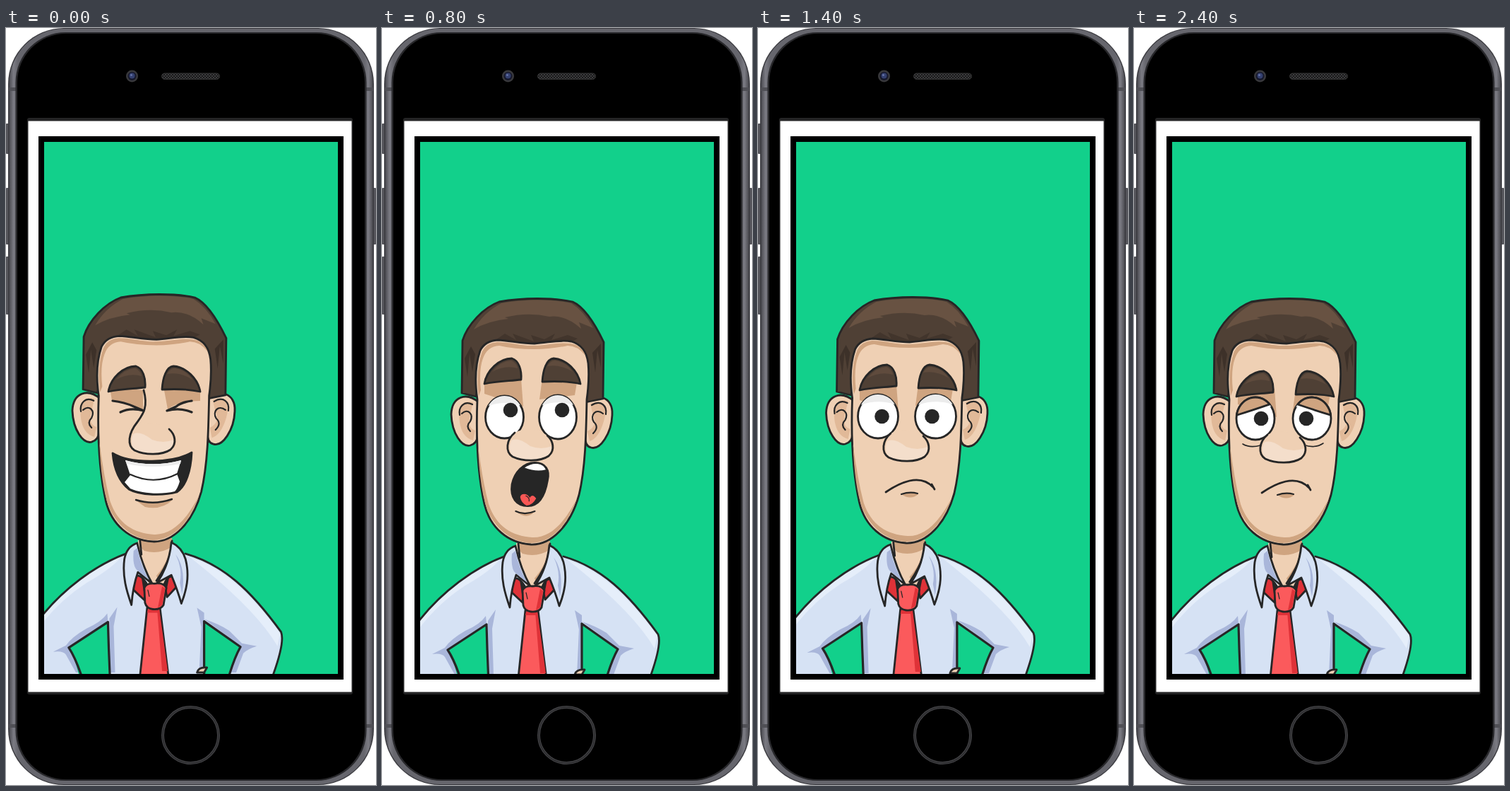
Animation, 524 px wide and 1070 px high, one loop 2600 ms. Source, as an HTML page:

```html
<!DOCTYPE html>
<html lang="en">
<head>
<meta charset="utf-8">
<title>Many moods</title>
<style>
html, body { margin: 0; width: 100%; height: 100%; overflow: hidden; background: #fff; }
svg { display: block; width: 100%; height: 100%; }
.ink { stroke: #262626; stroke-width: 2.8; stroke-linecap: round; stroke-linejoin: round; }
.mood { visibility: hidden; }
.mood.on { visibility: visible; }
</style>
</head>
<body>
<svg viewBox="0 0 524 1070">
  <defs>
    <linearGradient id="rim">
      <stop offset="0" stop-color="#4a4a50"/><stop offset=".012" stop-color="#7b7b83"/>
      <stop offset=".024" stop-color="#66666d"/><stop offset=".976" stop-color="#66666d"/>
      <stop offset=".988" stop-color="#7b7b83"/><stop offset="1" stop-color="#4a4a50"/>
    </linearGradient>
    <pattern id="mesh" width="4" height="4" patternUnits="userSpaceOnUse">
      <rect width="4" height="4" fill="#19191a"/>
      <path d="M0 0L4 4M4 0L0 4" stroke="#454547" stroke-width=".8"/>
    </pattern>
    <clipPath id="screen"><rect x="54" y="161" width="416" height="752"/></clipPath>
  </defs>
  <g id="phone"></g>
  <g clip-path="url(#screen)">
    <g id="man"></g>
    <g id="moods"></g>
  </g>
</svg>
<script>
const SKIN = '#efd0b4', TAN = '#cfa480', HAIR = '#4f4035', BROWN = '#685242';
const SHIRT = '#d6e2f4', BLUE = '#a9b6da', PALE = '#e5eefa', INK = '#262626';
const RED = '#fb5a5c', CRIMSON = '#df3238', GREEN = '#12d08b';

const shape = (d, fill) => `<path d="${d}" fill="${fill}"/>`;
const inked = (d, fill) => `<path class="ink" d="${d}" fill="${fill}"/>`;
const line = (d, w = 2.8) => `<path class="ink" d="${d}" fill="none" style="stroke-width:${w}"/>`;
const rect = (x, y, w, h, fill, r = 0, more = '') =>
  `<rect x="${x}" y="${y}" width="${w}" height="${h}" rx="${r}" fill="${fill}" ${more}/>`;
const disc = (x, y, r, fill, more = '') => `<circle cx="${x}" cy="${y}" r="${r}" fill="${fill}" ${more}/>`;
const moved = (x, y, body, sx = 1, sy = sx) =>
  `<g transform="translate(${x} ${y}) scale(${sx} ${sy})">${body}</g>`;

function phone() {
  const keys = [[0, 135, 43], [0, 226, 80], [0, 323, 82], [519, 226, 80]]
    .map(([x, y, h]) => rect(x, y, 5, h, '#55555b', 1)).join('');
  const bands = [84, 984].map(y =>
    rect(4, y, 10, 5, '#505056') + rect(510, y, 10, 5, '#505056')).join('');
  return keys +
    rect(3, 0, 518, 1070, '#3c3c41', 79) +
    rect(4.5, 1, 515, 1068, 'url(#rim)', 78) + bands +
    rect(13.5, 6, 497, 1058, '#28282b', 71) +
    rect(16, 8, 492, 1054, '#000', 69) +
    disc(178.5, 68, 8.5, '#39393c') + disc(178.5, 68, 6, '#15172b') +
    disc(178.5, 67.5, 4, '#34406f') + disc(177.5, 66.5, 1.5, '#6472a5') +
    rect(220.5, 64, 82, 8.5, 'url(#mesh)', 4.2, 'stroke="#333" stroke-width="1"') +
    disc(261.5, 999.5, 39.5, '#000', 'stroke="#414144" stroke-width="4"') +
    disc(261.5, 999.5, 39.5, 'none', 'stroke="#29292b" stroke-width="1.4"') +
    rect(30, 127, 461, 815, '#242425', 3) +
    rect(31.5, 131.5, 458, 807, '#fff') +
    rect(46, 153, 432, 768, '#000') + rect(54, 161, 416, 752, GREEN);
}

function shirt() {
  const left = 'M34 862L54 836C85 797 130 763 173 747';
  const right = 'C310 762 349 799 391 857Q397 872 377 925';
  return shape(`${left}H257${right}V940H34Z`, SHIRT) +
    shape('M54 838C86 799 130 766 168 750Q155 767 118 788Q81 812 54 847Z', PALE) +
    shape('M263 752C313 768 350 805 390 859L386 877Q355 824 263 752Z', PALE) +
    shape('M93 878L148 842L147 831Q139 843 118 852Q97 864 89 876L71 885Q85 883 89 889L103 914H111Z', BLUE) +
    shape('M283 839Q302 845 318 855L336 873L357 877Q344 881 338 887L328 914H320L334 878L306 856Z', BLUE) +
    shape('M150 838L161 822L156 849L158 914H150Z', BLUE) +
    shape('M283 830L273 823L279 850L276 914H283Z', BLUE) +
    shape('M147 844L94 879Q102 891 112 940H150V913Z', GREEN) +
    shape('M283 842L334 878Q325 896 312 940H283Z', GREEN) +
    line(left + 'M257 747' + right) +
    line('M148 843L93 879Q103 894 113 925M148 843Q149 884 151 925', 3.2) +
    line('M283 842L334 878Q325 894 316 925M283 842V925', 3.2) +
    inked('M273 914Q275 906 287 907L283 914Z', SKIN);
}

function collar() {
  return shape('M190 728H239L240 752L225 792L205 790L192 760Z', SKIN) +
    shape('M193 725H238V737Q220 749 199 743L193 737Z', TAN) +
    shape('M236 739L240 759L219 785L216 778Q231 761 236 739Z', TAN) +
    line('M193 729L195 748M238 729L236 747Q229 767 216 785') +
    inked('M184 780Q193 773 202 789L199 812L184 798Z', CRIMSON) +
    inked('M241 780Q232 776 227 790L231 808L244 794Z', CRIMSON) +
    shape('M195 780Q204 786 205 793L198 800ZM234 780L226 791L230 800Z', INK) +
    inked('M189 732Q174 737 171 755C168 779 174 799 181 819Q183 793 190 773L210 789Q196 764 189 732Z', SHIRT) +
    shape('M184 743Q182 766 190 771L205 783Q193 761 189 739Z', BLUE) +
    inked('M237 731Q252 738 257 755C263 779 258 799 251 817Q246 799 237 777L217 788Q234 763 237 731Z', SHIRT) +
    shape('M243 748Q253 768 249 788L252 804Q258 768 243 748Z', BLUE) +
    inked('M203 823L192 928H234L221 823Z', RED) +
    shape('M217 825L224 912H232L220 824Z', CRIMSON) +
    shape('M204 825H219L218 830H203Z', CRIMSON) +
    inked('M199 795Q202 788 213 789Q226 787 230 795L226 819Q222 826 211 825Q202 824 200 816Z', RED) +
    shape('M224 793L228 796L224 819L218 823Z', CRIMSON) +
    line('M204 798L206 807', 1.2);
}

function head() {
  return inked('M137 529C119 514 99 521 98 546C99 573 113 593 125 590Q135 587 135 577Z', SKIN) +
    shape('M129 529C110 524 107 543 111 562Q115 579 129 583L132 569Q121 565 124 551Z', '#e1b998') +
    line('M128 532C116 526 108 536 110 547M113 545C122 537 130 546 125 556Q118 563 125 570', 2.2) +
    inked('M288 530C302 515 328 520 326 547C325 573 309 597 296 593Q287 591 288 577Z', SKIN) +
    shape('M295 531C313 525 320 538 314 556Q307 580 294 584L291 570Q306 562 299 548Z', '#e1b998') +
    line('M297 533C310 525 319 534 317 546M313 545C303 537 294 547 300 557Q308 564 299 573', 2.2) +
    inked('M113 516L114 442C121 419 144 395 166 387C199 381 243 381 270 387C286 394 302 419 314 444L313 524L288 529L277 453H150L133 521Z', HAIR) +
    shape('M130 426Q144 402 169 389C201 383 243 383 268 389Q286 400 299 424L279 416L282 425Q260 405 237 408Q207 401 174 409L179 411Q150 414 130 426Z', BROWN) +
    shape('M117 467L121 493L124 460L128 486L132 461L126 450ZM298 459L302 487L305 455L310 480L310 446Z', '#3d3129') +
    shape('M174 432L190 441L185 432L215 443L211 434L230 440L245 432L240 441L263 434L277 439L265 446L216 449L158 443Z', '#42352c') +
    inked('M135 525Q129 485 139 456Q146 442 164 441C181 442 199 446 216 446C235 445 251 440 268 443Q289 449 292 474Q294 496 290 525C289 577 288 622 279 660C267 703 240 731 211 730C178 728 153 706 145 673C136 633 133 578 135 525Z', SKIN) +
    shape('M137 520Q132 483 142 457Q148 445 163 444C181 444 199 450 216 449C237 448 251 444 267 446Q282 448 288 463Q277 449 263 449Q239 454 216 454Q187 454 166 449Q149 450 143 467Q137 483 140 512Z', TAN) +
    shape('M136 590Q138 650 149 681C163 712 187 727 211 728C238 728 261 707 276 665C259 699 238 721 213 720C184 718 162 705 151 673Q142 638 136 590Z', TAN);
}

// Face parts
function nose(x, y, long) {
  const bulb = 'C-35 -29 -37 -12 -26 -5C-11 2 13 2 25 -6C35 -15 31 -28 23 -35';
  const bridge = long ? 'M-13 -90C-6 -65 -15 -55 -22 -45' : 'M-23 -39';
  return moved(x, y,
    shape('M24 -35Q36 -25 31 -10L24 -6Z', '#dfb592') +
    shape('M-23 -39' + bulb + 'Q0 -50 -23 -39Z', SKIN) +
    shape('M-28 -28C-34 -12 -26 -5 -20 -3C-8 1 12 1 24 -6Q30 -11 29 -20Q15 -14 -1 -20Q-18 -33 -28 -28Z', '#f4decb') +
    line(bridge + bulb));
}

function eye(x, y, rx, ry, px, py, lid = 0) {
  const at = a => `${x + rx * Math.cos(a)} ${y + ry * Math.sin(a)}`;
  const ball = `<ellipse class="ink" cx="${x}" cy="${y}" rx="${rx}" ry="${ry}" fill="#fff"/>`;
  const shade = shape(`M${at(3.7)}A${rx} ${ry} 0 0 1 ${at(5.7)}Q${x} ${y - ry * .8} ${at(3.7)}Z`, '#ececec');
  let cover = '';
  if (lid) {
    const [a, b] = lid > 0 ? [3.3, 5.55] : [3.87, 6.12];
    cover = inked(`M${at(a)}A${rx} ${ry} 0 0 1 ${at(b)}Q${x} ${y - 13} ${at(a)}Z`, TAN);
  }
  return ball + shade + disc(px, py, 10.3, INK) + cover;
}

const eyesWide = y => eye(170, y, 28.5, 31, 175.5, y) + eye(251.5, y, 29, 31, 246.5, y);
const eyesUp = eye(173.5, 550, 27, 30, 182, 540) + eye(249, 550, 26.5, 31, 255, 540);
const eyesMad = eye(175, 545, 27, 29.5, 180, 545) + eye(250.5, 545, 25.5, 29.5, 249.5, 545);
const eyesTired =
  line('M154 588Q164 594 179 590M240 589Q256 595 268 587', 1.6) +
  eye(172, 552, 27, 30, 180, 552, 1) + eye(252, 552, 27, 30, 244, 552, -1);

const eyesShut = (l, r, y) =>
  moved(l, y, shape('M-3 -20L44 -15V13Q23 0 0 0Z', TAN) +
    line('M1 0Q18 2 31 8L45 14Q26 9 12 16', 3.2)) +
  moved(r, y, shape('M12 -20L-39 -15L-34 12Q-19 0 12 0Z', TAN) +
    line('M0 0Q-15 2 -22 8L-35 14Q-17 9 0 16', 3.2));

const socket = (l, r, y) =>
  shape(`M${l} ${y}H${l + 52}L${l + 55} ${y + 40}L${l} ${y + 22}Z`, TAN) +
  shape(`M${r} ${y}H${r + 50}L${r + 46} ${y + 24}L${r - 4} ${y + 30}Z`, TAN);

const brow = (d, glow) => inked(d, HAIR) + shape(glow, '#5f4b3d');
const browsWorried = (l, r, y) =>
  moved(l, y, brow('M0 36C3 17 21 0 39 0C49 3 53 17 52 30C36 32 17 32 0 36Z', 'M11 19Q23 4 38 3Q46 7 47 14Q29 9 11 19Z')) +
  moved(r, y, brow('M0 33C1 16 6 1 16 0C34 1 51 18 54 36C36 32 17 32 0 33Z', 'M7 11Q12 3 18 3Q34 5 43 19Q26 8 7 11Z'));
const browsDoubt =
  brow('M148 510C150 496 169 484 188 485C198 486 202 496 199 505C183 502 165 505 148 510Z', 'M159 497Q171 488 187 488Q194 489 196 494Q178 490 159 497Z') +
  brow('M229 498C230 482 240 465 251 466C268 469 279 489 280 506C263 501 246 497 229 498Z', 'M238 478Q245 468 253 469Q266 475 272 489Q255 475 238 478Z');
const browsMad =
  brow('M152 510C158 496 177 490 194 490C207 490 212 499 208 510C206 522 202 529 195 525C186 515 168 511 152 510Z', 'M165 501Q178 493 196 494Q204 496 205 501Q186 497 165 501Z') +
  brow('M222 504C222 494 242 490 260 491C270 493 276 501 279 507C265 510 253 513 242 522C233 529 225 521 222 504Z', 'M227 500Q242 494 260 494L269 501Q249 497 227 500Z');
const browsPained =
  brow('M146 503C156 492 176 487 195 489C206 491 209 503 206 513C204 524 200 529 194 525C182 515 164 510 146 503Z', 'M163 497Q179 490 195 492L202 499Q181 495 163 497Z') +
  brow('M221 520C220 504 227 488 240 488C260 487 275 494 283 504C264 509 251 516 241 525C231 531 223 530 221 520Z', 'M229 502Q235 490 247 491Q264 491 272 498Q249 495 229 502Z');

const laugh = (x, y, sx, sy) => moved(x, y,
  inked('M151 601C177 617 237 615 263 600C262 625 255 648 242 656C224 661 190 661 174 652C160 641 153 624 151 601Z', INK) +
  shape('M169 611C193 618 223 618 248 611L242 630L246 641Q243 651 239 655C219 660 192 658 176 651L168 642L176 632Z', '#fff') +
  shape('M169 611C193 618 223 618 248 611L247 616Q208 624 171 616Z', '#ececec') +
  line('M176 631Q210 647 243 630', 2) +
  shape('M183 667Q209 675 236 667Q220 682 197 677Z', TAN) +
  line('M184 667Q209 675 235 666', 2.4), sx, sy);

const gape = (x, y, s) => moved(x, y,
  inked('M180 663C184 644 198 629 216 629C233 629 240 641 236 657C232 681 222 697 205 697C187 697 177 684 180 663Z', INK) +
  shape('M200 637C211 629 228 628 233 640Q218 644 200 637Z', '#fff') +
  shape('M193 683C194 676 205 677 208 684Q212 677 218 685Q212 696 203 696Q195 693 193 683Z', '#f95755') +
  line('M202 681Q208 684 207 689', 1.4) +
  shape('M186 705Q201 712 216 705Q204 720 186 705Z', TAN) +
  line('M186 705Q200 712 216 705', 2.4), s);

const frown = (y, tilt = 0) => moved(181, y,
  line(`M0 11C19 -2 48 -${13 + tilt} 67 4M65 0L69 7`) +
  shape('M22 14Q34 10 46 14Q35 23 22 14Z', TAN) + line('M22 14Q34 10 45 13', 2.2));

const wail =
  inked('M172 684C173 660 178 641 187 634C204 627 231 627 248 634C257 645 261 663 258 683C239 671 196 672 172 684Z', INK) +
  shape('M182 648Q187 635 193 633C209 628 231 628 246 634L254 649Q219 641 182 648Z', '#fff') +
  shape('M187 637Q217 624 249 637L246 634Q217 626 193 633Z', '#ececec') +
  shape('M197 688Q215 679 233 688Q216 699 197 688Z', TAN) + line('M197 688Q215 678 233 688', 2.3);

// Stance: [scaleX, scaleY, x, y]
const REST = [1, 1, 0, 0], UP = [1.0088, 1.0057, -4.9, -8.2], DOWN = [.991, .9857, .9, 7.4];
const BACK = [1.0044, 1, -3.4, -4], HALF = [1.002, 1, -1.7, -2];
const worried = (l, r, y) => socket(l, r, y + 28) + browsWorried(l, r, y);
const doubt = socket(148, 229, 500) + eyesUp + browsDoubt;
const mad = eyesMad + browsMad;

const STEP = 200;
const moods = [
  [UP, eyesShut(150, 263, 527) + nose(208, 602, true) + browsWorried(145, 221, 478) + laugh(0, 0, 1, 1)],
  [REST, worried(145, 227, 467) + eyesWide(548) + nose(211, 612) + laugh(0, 10, 1, 1)],
  [REST, worried(145, 227, 478) + eyesUp + nose(211, 611) + frown(640)],
  [REST, doubt + nose(210, 611) + frown(639)],
  [REST, worried(145, 227, 467) + eyesUp + nose(211, 611) + gape(21, 45, .905)],
  [DOWN, worried(142, 226, 473) + eyesWide(552) + nose(211, 616) + laugh(-9.6, -7, 1.07, 1.05)],
  [BACK, worried(141, 226, 468) + eyesWide(547.5) + nose(210, 613) + gape(0, 0, 1)],
  [HALF, worried(144, 227, 476) + eyesWide(549) + nose(211, 612) + frown(645, 3)],
  [REST, mad + nose(214, 607) + gape(16, 36, .935)],
  [REST, mad + nose(214, 607) + frown(645, 4)],
  [REST, eyesShut(152, 270, 529) + nose(212, 614, true) + browsPained + wail],
  [REST, worried(144, 227, 461) + eyesUp + nose(211, 612) + frown(643, 2)],
  [REST, socket(147, 229, 510) + eyesTired + nose(212, 614) + browsWorried(145, 229, 485) + frown(646, 3)]
];

const find = id => document.getElementById(id);
const man = find('man');
find('phone').innerHTML = phone();
man.innerHTML = shirt() + collar() + head();
find('moods').innerHTML = moods.map(([, face]) => `<g class="mood">${face}</g>`).join('');
const faces = [...document.querySelectorAll('.mood')];

let shown = -1;
const start = performance.now();
function draw(now) {
  const i = Math.floor(Math.max(0, now - start) / STEP) % moods.length;
  if (i !== shown) {
    const [sx, sy, x, y] = moods[i][0];
    man.setAttribute('transform', `matrix(${sx} 0 0 ${sy} ${x} ${y})`);
    faces.forEach((face, k) => face.classList.toggle('on', k === i));
    shown = i;
  }
  requestAnimationFrame(draw);
}
draw(start);
</script>
</body>
</html>
```
